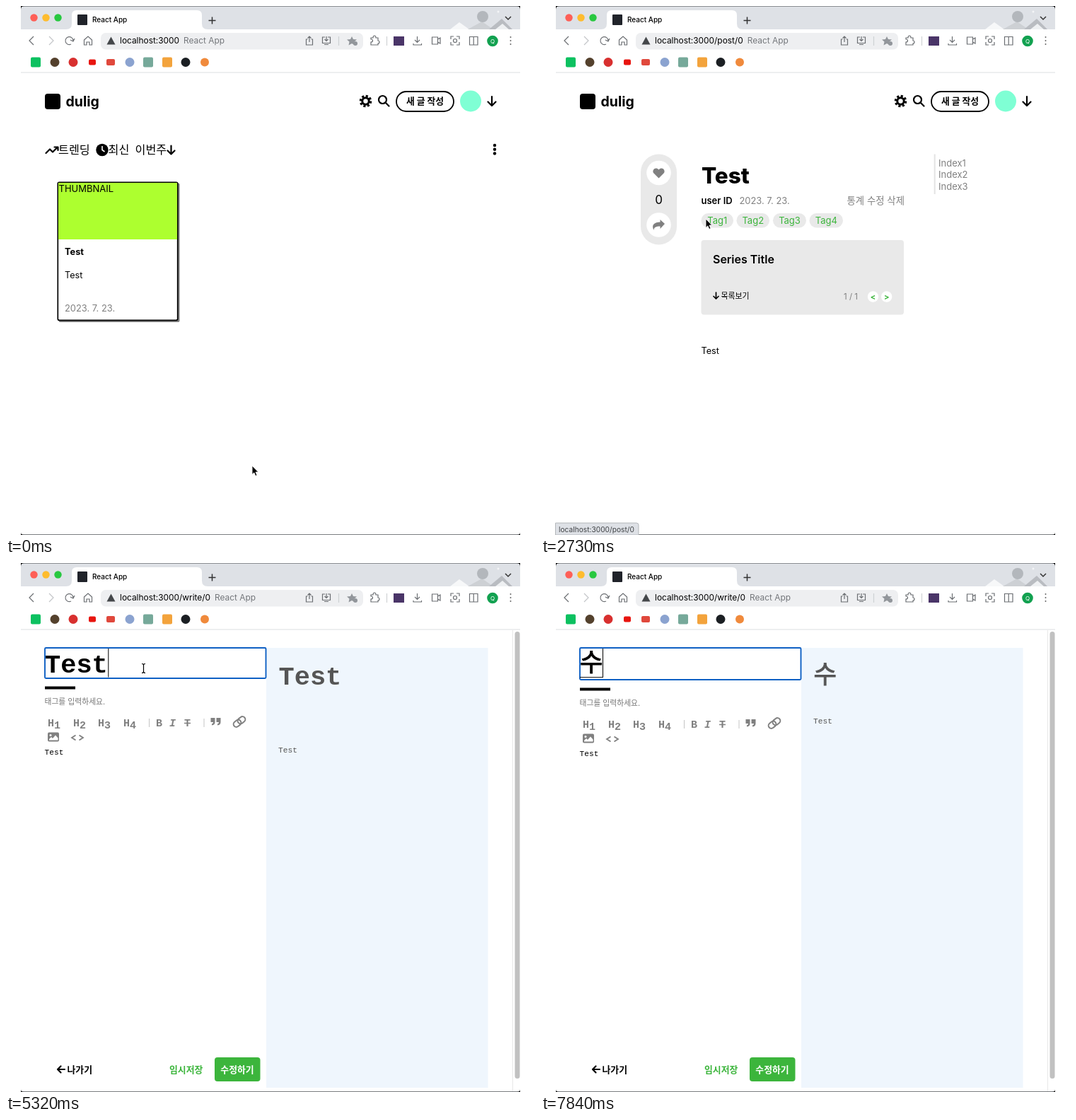
An HTML page that plays this animation: 748x748 px, repeating every 8 s.

```html
<!DOCTYPE html>
<html lang="ko">
<head>
<meta charset="utf-8">
<title>Blog demo</title>
<style>
html, body { margin: 0; width: 100%; height: 100%; overflow: hidden; background: #fff; }
svg { display: block; width: 100vw; height: 100vh; font: 13px Inter, "Noto Sans CJK KR", sans-serif; }
.line { fill: none; stroke: #6b6e72; stroke-width: 1.2; }
.bold { fill: none; stroke: #000; stroke-width: 2.2; stroke-linecap: round; stroke-linejoin: round; }
.b { font-weight: 700; }
.gray { fill: #808080; }
.green { fill: #3cb53c; }
.panel { fill: #e9e9e9; }
.mid { text-anchor: middle; }
.mono { font-family: "Liberation Mono", "Noto Sans CJK KR", monospace; white-space: pre; }
.big { font-size: 37px; font-weight: 700; }
.big.hangul { font-size: 35.4px; font-weight: 400; stroke: currentColor; stroke-width: .9; }
</style>
</head>
<body>
<svg viewBox="0 0 748 748">
  <!-- browser window -->
  <path fill="#dee1e6" d="M21 0H727V33H21z"/>
  <path d="M21 .5H727" stroke="#8d9094"/>
  <path d="M21 747.5H727" stroke="#7a7d80"/>
  <path d="M21 0h5q-5 0-5 5zM727 0h-5q5 0 5 5zM21 748h4q-4 0-4-4zM727 748h-4q4 0 4-4z"/>
  <circle cx="39.5" cy="16.5" r="5.2" fill="#fe5f57"/>
  <circle cx="56.5" cy="16.5" r="5.2" fill="#febc2e"/>
  <circle cx="73.5" cy="16.5" r="5.2" fill="#28c840"/>
  <path fill="#fff" d="M85 33q8 0 8-8V13q0-7 7-7H270q7 0 7 7V25q0 8 8 8z"/>
  <rect x="101" y="12" width="14" height="15" rx="1" fill="#20232a"/>
  <text x="122" y="23" font-size="10" font-weight="500">React App</text>
  <path d="M286.5 20.5h10M291.5 15.5v10" stroke="#333" stroke-width="1.5"/>
  <path fill="#f7f8f9" d="M628 33l13-10 14 10z"/>
  <path fill="#cdd0d4" d="M653 33l20-11 16 11z"/>
  <path fill="#b9bcc1" d="M683 33l18-15 15 15z"/>
  <path fill="#eef0f2" d="M692 33l10-8 9 8z"/>
  <circle cx="674" cy="15" r="8" fill="#b3b7bc"/>
  <circle cx="696" cy="8" r="1.5" fill="#f4f5f7"/>
  <path fill="none" stroke="#333" stroke-width="1.5" d="M706 15l4 4 4-4"/>

  <path d="M21 94H727" stroke="#dcdee1"/>
  <rect x="134" y="38" width="371" height="23.5" rx="7" fill="#eeeff1"/>
  <path fill="#44474a" d="M148.5 43.5l6 11h-12z"/>
  <g class="line">
    <path d="M39 43l-6 6 6 6"/>
    <path d="M61 43l6 6-6 6" stroke="#c3c5c8"/>
    <path d="M95 49a5.5 5.5 0 1 0-3 5M97 46l-2 4-4-2"/>
    <path d="M110.5 48l5.5-5 5.5 5v7h-3.5v-4h-4v4h-3.5z"/>
    <path d="M426.5 47h-2v8h9v-8h-2M429 51v-8m-2.5 2.5l2.5-2.5 2.5 2.5"/>
    <path d="M451 44h-3.5v8.500h11V44H455M450 54.500h6M453 43v6m-2.500-2l2.500 2.500 2.500-2.500"/>
    <path d="M470.500 43v13M538.500 43v13" stroke="#cfd1d4"/>
    <path d="M516 45h3q0-3 2-3t2 3h3v4q2 0 2 2t-2 2v2h-10v-4q2.500 0 2.500-2t-2.500-2z"/>
    <path d="M581.500 43v8m-3.500-3l3.500 3.500 3.500-3.500M576 53v2h11.500v-2"/>
    <path d="M602.500 44h8v10h-8zM610.500 47l3.500-2v8l-3.500-2"/>
    <path d="M629 47v-4h4m4 0h4v4m0 4v4h-4m-4 0h-4v-4"/>
    <circle cx="635" cy="49" r="2.5"/>
    <path d="M655.500 43.500h11.500v11.500h-11.500zM661.200 43.500v11.500"/>
  </g>
  <path fill="#92969b" d="M489 43l2 4 5 .5-3.500 3 1 5-4.500-2.500-4.500 2.500 1-5-3.500-3 5-.5z"/>
  <circle cx="494" cy="53" r="3" fill="#92969b"/>
  <text y="53" x="161" font-size="11.9"><tspan id="url"></tspan><tspan dx="6" fill="#74777b">React App</tspan></text>
  <rect x="548" y="43" width="15" height="13" fill="#4a3568"/>
  <circle cx="688" cy="49.5" r="7.8" fill="#12a150"/>
  <text class="mid" x="688" y="52.5" font-size="8" fill="#fff">Q</text>
  <path d="M713.500 44v.1m0 4.900v.1m0 4.900v.1" stroke="#666" stroke-width="2" stroke-linecap="round"/>
  <g id="bookmarks"></g>

  <!-- site header -->
  <g id="header">
    <rect x="55" y="124" width="22" height="22" rx="4"/>
    <text class="b" x="84.5" y="142" font-size="19.5">dulig</text>
    <circle cx="508.5" cy="134.5" r="7" fill="none" stroke="#000" stroke-width="3.500" stroke-dasharray="3 2.5"/>
    <circle cx="508.5" cy="134.5" r="4.7" fill="none" stroke="#000" stroke-width="3"/>
    <circle class="bold" cx="532.5" cy="132.5" r="5.5"/>
    <path class="bold" d="M536.500 136.500l5 5"/>
    <rect class="bold" style="stroke-width:1.8" x="552" y="121" width="81" height="28" rx="14"/>
    <text class="b mid" x="592.5" y="139" font-size="12.8">새 글 작성</text>
    <circle cx="657" cy="134.5" r="15" fill="#7fffd4"/>
    <path class="bold" d="M687 128v13m-5.500-5.500l5.500 5.500 5.500-5.500"/>
  </g>

  <!-- post list -->
  <g id="home">
    <path class="bold" d="M56.500 208l5.500-5.500 4 4 7-7M68.500 199.500h5v4.500"/>
    <circle cx="136" cy="203.5" r="8.7"/>
    <path d="M136 198v5.500l3.500 2.500" fill="none" stroke="#fff" stroke-width="1.6"/>
    <g font-size="16.2"><text x="74" y="208.5">트렌딩</text><text x="144.5" y="208.5">최신</text><text x="182.5" y="208.5">이번주</text></g>
    <path class="bold" d="M233.500 197.500v12m-5-5l5 5 5-5"/>
    <g><circle cx="691" cy="197" r="2.2"/><circle cx="691" cy="202.7" r="2.2"/><circle cx="691" cy="208.5" r="2.2"/></g>
    <g id="card">
      <rect id="shadow" x="72.5" y="248.5" width="171" height="196.5" rx="2" fill="#808080"/>
      <rect x="73.3" y="249.3" width="169.4" height="195" rx="2" fill="#fff" stroke="#000" stroke-width="1.7"/>
      <path fill="#adff2f" d="M74 250H242V330H74z"/>
      <text x="74.5" y="263">THUMBNAIL</text>
      <text class="b" x="83" y="352" font-size="12.8">Test</text>
      <text x="83" y="385" font-size="12.6">Test</text>
      <text class="gray" x="83" y="431.5" font-size="12.9">2023. 7. 23.</text>
    </g>
  </g>

  <!-- single post -->
  <g id="post">
    <rect class="panel" x="141" y="209.5" width="51" height="128" rx="25.5"/>
    <circle cx="166.5" cy="236" r="17.3" fill="#fff"/><circle cx="166.5" cy="309.5" r="17.3" fill="#fff"/>
    <path class="gray" d="M166.500 243.500l-7.500-7.500c-2.500-4 3-9.500 7.500-4.500 4.500-5 10 .5 7.500 4.500z"/>
    <path class="gray" d="M175 308l-6.500-6v3.500c-8 0-13 4-9 11.500 0-4 3-5.500 9-5.500v3.500z"/>
    <text class="mid" x="166.5" y="280" font-size="17">0</text>
    <text x="227" y="251" font-size="31.5" font-weight="800">Test</text>
    <text x="226.5" y="280" font-weight="600">user ID</text>
    <text class="gray" x="280.5" y="280" font-size="12.9">2023. 7. 23.</text>
    <text class="gray" x="514" y="280" font-size="13.4" text-anchor="end">통계 수정 삭제</text>
    <g id="tags"></g>
    <rect class="panel" x="226.5" y="331" width="286.5" height="105.5" rx="4"/>
    <text x="243" y="364" font-size="16" font-weight="600">Series Title</text>
    <path class="bold" style="stroke-width:1.7" d="M247.500 405v9m-3.500-3.500l3.500 3.500 3.500-3.500"/>
    <text x="254.5" y="413.5" font-size="10.9" font-weight="500">목록보기</text>
    <text class="gray" x="428" y="415" font-size="11.5">1 / 1</text>
    <circle cx="469.5" cy="411" r="7.7" fill="#fff"/><circle cx="488.7" cy="411" r="7.7" fill="#fff"/>
    <g class="green b mid" font-size="11"><text x="469.5" y="415">&lt;</text><text x="488.7" y="415">&gt;</text></g>
    <text x="226.5" y="492" font-size="12.7">Test</text>
    <path d="M556.700 209.500V266" stroke="#e4e4e4" stroke-width="2"/>
    <g class="gray"><text x="562" y="227">Index1</text><text x="562" y="243.3">Index2</text><text x="562" y="259.5">Index3</text></g>
  </g>

  <!-- editor -->
  <g id="write">
    <path d="M716.500 95V747" stroke="#e8e8e8"/>
    <rect x="719.5" y="97" width="7" height="632" rx="3.5" fill="#c1c1c1"/>
    <path fill="#eff6fd" d="M368 120H681.500V742H368z"/>
    <rect id="outline" x="55" y="120" width="312.5" rx="1.5" fill="none" stroke="#0f60c4" stroke-width="1.9"/>
    <text id="title" class="mono big" x="55"></text>
    <path id="underline" d="M55 161.700h33" stroke="#000"/>
    <path id="caret" d="M0 121v40.500" stroke="#000"/>
    <g id="form">
      <path d="M55 174.500h43v4H55z"/>
      <text x="54.5" y="200" font-size="10.8" fill="#757575">태그를 입력하세요.</text>
      <g id="tools" class="mono b gray" font-size="15">
        <text x="212" y="230.5">B</text><text x="231" y="230.5" font-style="italic">I</text>
        <text x="252" y="230.5" text-decoration="line-through">T</text>
      </g>
      <path d="M202.500 220v12M280 220v12" stroke="#c4c4c4"/>
      <path class="gray" d="M289.500 219h6v6q0 4-4.500 4.500v-2q2-.5 2-2.500h-3.500zM297.500 219h6v6q0 4-4.500 4.500v-2q2-.5 2-2.500h-3.500z"/>
      <g fill="none" stroke="#808080" stroke-width="2" transform="rotate(-38 330 224.5)">
        <rect x="320.5" y="220.5" width="11.5" height="8" rx="4"/><rect x="328" y="220.5" width="11.5" height="8" rx="4"/>
      </g>
      <rect class="gray" x="59" y="239.5" width="16" height="13" rx="2"/>
      <circle cx="63" cy="243.5" r="1.5" fill="#fff"/>
      <path fill="#fff" d="M61 250.500v-1.500l3-3 2 2 4-4.500 3.500 4v3z"/>
      <path fill="none" stroke="#808080" stroke-width="1.8" d="M98.500 243.500l-5.500 3.500 5.500 3.500M103.500 243.500l5.500 3.500-5.500 3.500"/>
      <text class="mono" x="54.5" y="271" font-size="11.2">Test</text>
    </g>
    <text id="heading" class="mono big" x="385.5" fill="#555" color="#555"></text>
    <text id="body" class="mono" x="385" font-size="11.2" fill="#555">Test</text>
    <path class="bold" d="M83 716H73m4.500-4.500L73 716l4.500 4.500"/>
    <g class="b" font-size="12.9">
      <text x="86.5" y="720.5">나가기</text>
      <text class="green" x="231" y="720.5">임시저장</text>
      <rect class="green" x="295" y="699" width="64.5" height="34" rx="4"/>
      <text class="mid" x="327" y="720.5" fill="#fff">수정하기</text>
    </g>
  </g>

  <g id="status">
    <path id="statusBox" fill="#dee1e6" stroke="#b3b6ba"/>
    <text id="statusText" x="25" y="744" font-size="10.2" fill="#3f4245"></text>
  </g>

  <g id="cursor">
    <path id="arrow" stroke="#fff" stroke-width=".9" d="M0 0v12.500l2.800-2.600 2 4.600 2.200-1-2-4.400h3.800z"/>
    <path id="hand" fill="#fff" stroke="#000" d="M-2.300 1c0-1.500 2.500-1.500 2.500 0v4l5 1.200c1.200.3 1.600 1 1.400 2.100l-.9 5.500h-6l-4-5c-.8-1.300.6-2.100 1.600-1.100l.4.500zM1.500 9v3m1.800-3v3"/>
    <path id="beam" fill="none" stroke="#000" stroke-width="1.2" d="M-2.500-6.500q2.500 0 2.500 2 0-2 2.500-2M0-4.500v9M-2.500 6.500q2.500 0 2.500-2 0 2 2.500 2"/>
  </g>
</svg>
<script>
const LOOP = 8000, STEP = 70;
const OPEN_POST = 2380, OPEN_EDITOR = 4130, FOCUS = 4830, TYPE = 5390, CLEARED = 5810;
const $ = id => document.getElementById(id);
const show = (id, on) => $(id).style.display = on ? '' : 'none';
const set = (id, name, value) => $(id).setAttribute(name, value);
const clamp = v => Math.max(0, Math.min(1, v));

// [time, x, y] of the pointer's hot spot
const path = [
  [630, 348, 650], [1400, 163, 310], [2310, 163, 310], [2730, 233, 301],
  [3150, 436, 282], [3640, 471, 279], [4130, 471, 279], [4620, 240, 163], [4970, 194.5, 149]
];
const titles = [
  [0, 'Test'], [TYPE, 'Tes'], [5530, 'Te'], [5670, 'T'], [CLEARED, ''],
  [6370, 't'], [6440, 'tn'], [6580, 'tnw'], [6650, 'tnwj'], [6930, 'tnw'],
  [7070, 'tn'], [7210, 't'], [7350, ''], [7770, 'ㅅ'], [7840, '수']
];

function pointerAt(t) {
  const i = path.findIndex(p => p[0] > t);
  if (i === 0) return path[0].slice(1);
  if (i < 0) return path.at(-1).slice(1);
  const [t0, x0, y0] = path[i - 1], [t1, x1, y1] = path[i];
  const k = (t - t0) / (t1 - t0);
  return [x0 + (x1 - x0) * k, y0 + (y1 - y0) * k];
}

function drawEditor(t) {
  const title = titles.findLast(([start]) => t >= start)[1];
  const hangul = /[ㄱ-힣]/.test(title), tall = hangul || !title;
  const focused = t >= FOCUS;
  const color = title ? '#000' : '#757575';
  show('outline', focused);
  set('outline', 'height', tall ? 45 : 43);
  $('title').textContent = title || '제목을 입력하세요';
  $('heading').textContent = title;
  $('title').classList.toggle('hangul', tall);
  $('heading').classList.toggle('hangul', hangul);
  set('title', 'fill', color);
  set('title', 'color', color);
  set('title', 'y', tall ? 152.5 : 155);
  set('heading', 'y', hangul ? 170 : 172);
  set('body', 'y', t < CLEARED ? 268 : 227);
  set('form', 'transform', `translate(0 ${tall ? 2 : 0})`);
  show('underline', hangul);
  show('caret', focused && title);
  set('caret', 'transform', `translate(${hangul ? 87.5 : 56 + 22.2 * title.length} 0)`);
}

function draw(t) {
  const home = t < OPEN_POST, write = t >= OPEN_EDITOR, post = !home && !write;
  show('home', home);
  show('post', post);
  show('write', write);
  show('header', !write);
  $('url').textContent = 'localhost:3000' + (home ? '' : post ? '/post/0' : '/write/0');

  const lift = clamp((t - 1120) / 210);
  set('card', 'transform', `translate(0 ${-4 * lift})`);
  set('shadow', 'transform', `translate(${2 + 4 * lift} ${2 + 4 * lift})`);

  const link = t >= 1540 && t < 2940 ? 'post/0' : t >= 3780 && t < 4270 ? 'write/0' : '';
  show('status', link);
  $('statusText').textContent = 'localhost:3000/' + link;
  set('statusBox', 'd', `M20.500 731H${link === 'post/0' ? 135 : 138}q3 0 3 3V748H20.500z`);

  if (write) drawEditor(t);

  const [x, y] = pointerAt(t);
  const hand = home ? y < 445 && x < 243 : post && t >= 3150;
  const beam = write && y < 165;
  set('cursor', 'transform', `translate(${x} ${y})`);
  show('cursor', t < TYPE);
  show('hand', hand);
  show('beam', beam);
  show('arrow', !hand && !beam);
}

const square = (x, color, w = 14, h = w) =>
  `<rect x="${x - w / 2}" y="${79.5 - h / 2}" width="${w}" height="${h}" rx="2" fill="${color}"/>`;
const circle = (x, color, r = 6.5) => `<circle cx="${x}" cy="79.5" r="${r}" fill="${color}"/>`;
$('bookmarks').innerHTML = square(42, '#0cc160') + circle(69, '#54412d') + circle(95, '#d8302f') +
  square(122, '#e8150f', 10, 8) + square(148, '#e0483c', 12, 9) + circle(175, '#8ba3d0') +
  square(201, '#76a99a') + square(228, '#f3a33c') + circle(254, '#1b1f23') + circle(281, '#f08a3c', 6);

$('tags').innerHTML = [[226.5, 45.5], [276.5, 46.5], [328, 47], [379.5, 47.5]].map(([x, w], i) =>
  `<rect class="panel" x="${x}" y="293" width="${w}" height="20.5" rx="10.2"/>
   <text class="green mid" x="${x + w / 2}" y="308">Tag${i + 1}</text>`).join('');

$('tools').innerHTML += [59, 95, 130, 166].map((x, i) =>
  `<text x="${x}" y="230.5">H<tspan dy="3">${i + 1}</tspan></text>`).join('');

function tick() {
  const t = performance.now() % LOOP;
  draw(Math.floor(t / STEP) * STEP);
  requestAnimationFrame(tick);
}
tick();
</script>
</body>
</html>
```
